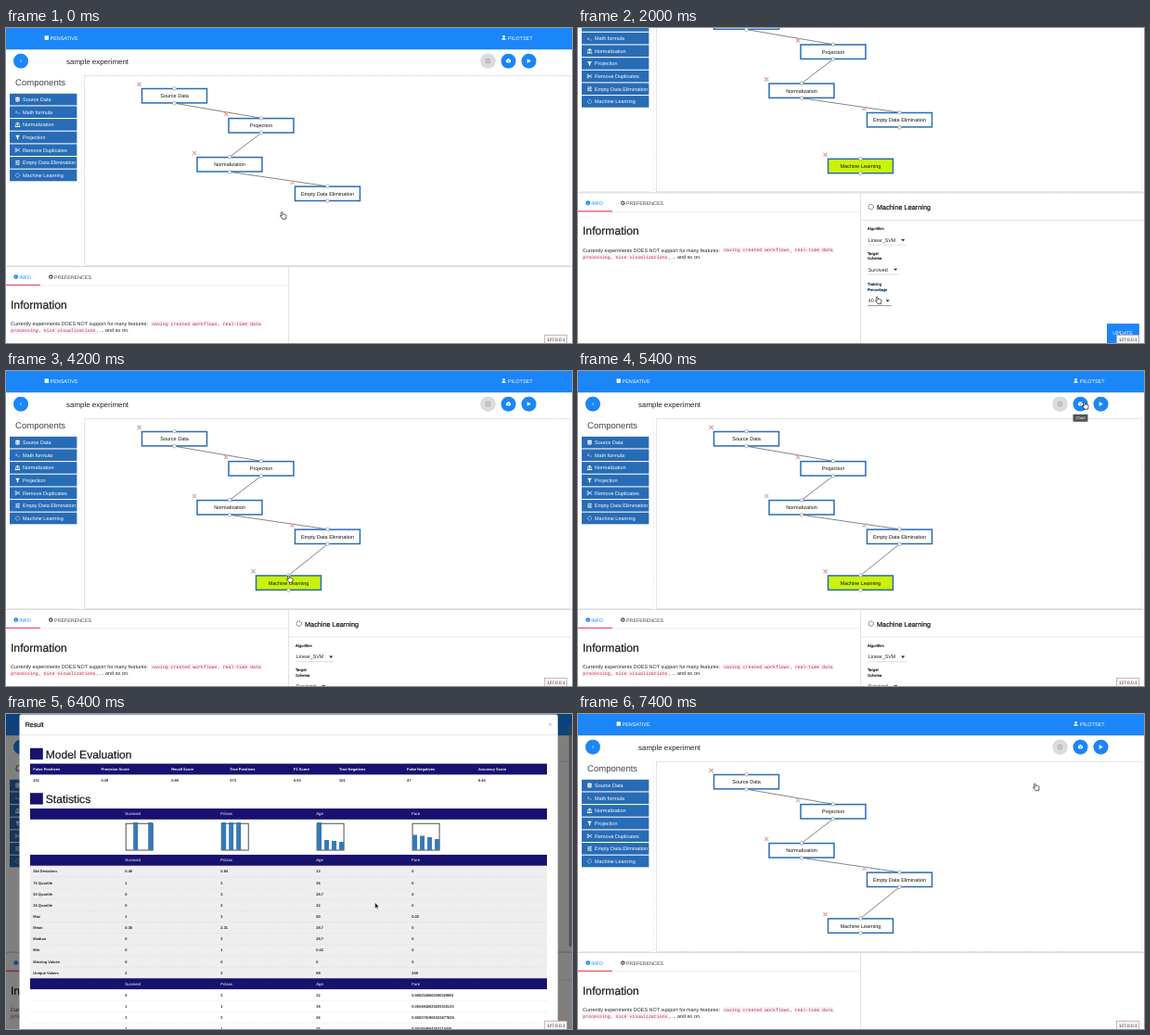
An HTML page that plays this animation: 610 by 340 pixels, repeating every 7500 ms.

```html
<!DOCTYPE html>
<html lang="en">
<head>
<meta charset="utf-8">
<title>Workflow editor</title>
<style>
html, body { margin: 0; width: 100%; height: 100%; overflow: hidden; background: #fff; }
svg { display: block; width: 610px; height: 340px; }
text { font-family: "Liberation Sans", Arial, sans-serif; text-rendering: geometricPrecision; white-space: pre; }
.code { font-family: "Liberation Mono", monospace; fill: #c7254e; }
.bold { font-weight: bold; }
.medium { stroke: currentColor; stroke-width: .2; }
.lift { filter: drop-shadow(0 .6px .7px #0005); }
.off { display: none; }
</style>
</head>
<body>
<svg id="stage" viewBox="0 0 610 340"></svg>
<script>
const LOOP = 7500, STEP = 100;
const BLUE = '#1a86fa', STEEL = '#286cb6', NAVY = '#17126f', INK = '#222', LIME = '#c9f20c';

// Drawing helpers: each returns markup; text is centred on cy.
const attrs = o => Object.entries(o).map(([k, v]) => ` ${k}="${v}"`).join('');
const tag = (name, o, inner = '') => `<${name}${attrs(o)}>${inner}</${name}>`;
const rect = (x, y, x2, y2, fill, o = {}) =>
  tag('rect', { x, y, width: x2 - x, height: y2 - y, fill, ...o });
const line = (x1, y1, x2, y2, stroke, o = {}) => tag('line', { x1, y1, x2, y2, stroke, ...o });
const circle = (cx, cy, r, fill, o = {}) => tag('circle', { cx, cy, r, fill, ...o });
const path = (d, o = {}) => tag('path', { d, fill: 'none', ...o });
const text = (x, cy, size, str, o = {}) =>
  tag('text', { x, y: +(cy + size * .36).toFixed(2), 'font-size': size, fill: INK, ...o }, str);
const group = (o, ...parts) => tag('g', o, parts.join(''));
const at = (x, y, ...parts) => group({ transform: `translate(${x} ${y})` }, ...parts);
const DASH = { 'stroke-width': .6, 'stroke-dasharray': '1.5 1' };

// Icons, drawn around their own centre
const spinner = (r, color) => circle(0, 0, r, 'none',
  { stroke: color, 'stroke-width': r * .36, 'stroke-dasharray': `${r * .45} ${r * .335}` });
const cube = (s, fill, gap) => path(`M0 ${-s}L${s} ${-s / 2}V${s / 2}L0 ${s}L${-s} ${s / 2}V${-s / 2}Z`, { fill }) +
  path(`M${-s} ${-s / 2}L0 0L${s} ${-s / 2}M0 0V${s}`, { stroke: gap, 'stroke-width': .5 });
const wire = d => path(d, { stroke: '#fff', 'stroke-width': .7 });
const solid = (d, fill = '#fff') => path(d, { fill });

const parts = [
  ['Source Data', solid('M-2.3-2Q0-3.2 2.3-2V2Q0 3.2-2.3 2Z') + path('M-2.3-.9Q0 .2 2.3-.9M-2.3.8Q0 1.9 2.3.8', { stroke: STEEL, 'stroke-width': .5 })],
  ['Math formula', text(-2.5, -.4, 5, 'x', { fill: '#fff' }) + text(.4, 1.6, 3, '2', { fill: '#fff' })],
  ['Normalization', solid('M-2.6-.8L0-2.7L2.6-.8ZM-2.7 1.6H2.7V2.6H-2.7Z') + wire('M-1.7-.6V1.6M0-.6V1.6M1.7-.6V1.6')],
  ['Projection', solid('M-2.4-2.2H2.4L.7 0V2.6L-.7 1.6V0Z')],
  ['Remove Duplicates', wire('M-1.4-1L2.6 1.6M-1.4 1L2.6-1.6') + circle(-1.9, -1.3, .8, 'none', { stroke: '#fff', 'stroke-width': .6 }) + circle(-1.9, 1.3, .8, 'none', { stroke: '#fff', 'stroke-width': .6 })],
  ['Empty Data Elimination', wire('M-2.4-1.8H2.4M-2.4 0H2.4M-2.4 1.8H2.4M1-2.6V-1M-1-.8V.8M.8 1V2.6')],
  ['Machine Learning', spinner(2.1, '#fff')]
];

const port = y => circle(0, y, 1.8, '#fff', { stroke: '#888', 'stroke-width': .6 });
const nodeBody = (label, o = {}) =>
  rect(-35, -7.7, 35, 7.7, '#fff', { stroke: STEEL, 'stroke-width': 1.5, ...o }) +
  text(0, .2, 5.5, label, { 'text-anchor': 'middle', fill: '#111' }) + port(-8) + port(8) +
  path('M-40-14.4L-35.8-10.2M-35.8-14.4L-40-10.2', { stroke: '#dba9a9', 'stroke-width': 1.3 });
const nodes = [['Source Data', 181.5, 73.2], ['Projection', 275, 105.3],
  ['Normalization', 241, 147.3], ['Empty Data Elimination', 346.5, 178.8]];
const EDGE = { 'stroke-width': .9 };
const edges = nodes.slice(1).map(([, x, y], i) =>
  line(nodes[i][1], nodes[i][2] + 8, x, y - 8, '#777', EDGE)).join('');
const ML = [304.5, 228.6];

const round = (x, fill, icon) => circle(x, 35.6, 7.9, fill, { class: 'lift' }) + at(x, 35.6, icon);

const topBars = rect(0, -90, 610, 23.3, BLUE) +
  rect(41.6, 8.4, 46, 12.8, '#fff') +
  text(47.5, 10.6, 5.45, 'PENSATIVE', { fill: '#fff' }) +
  at(536.5, 10.5, circle(0, -1.2, 1.3, '#fff'), solid('M-2.3 2.3Q-2.3.2 0 .2T2.3 2.3Z')) +
  text(541, 10.6, 5.5, 'PILOTSET', { fill: '#fff' }) +
  rect(0, 23.3, 610, 48, '#fff', { class: 'lift' }) +
  round(16, BLUE, wire('M.7-1.4L-.6 0L.7 1.4')) +
  text(65, 35.7, 7.95, 'sample experiment') +
  round(519.5, '#dcdcdc', path('M-2.3-2.3H1.5L2.3-1.5V2.3H-2.3ZM-1.2-2.3V-.8H1V-2.3M-1.3 2.3V.6H1.3V2.3', { stroke: '#aaa', 'stroke-width': .7 })) +
  round(541.5, BLUE, cube(2.5, '#fff', BLUE)) +
  round(563.5, BLUE, solid('M-1.8-2.3L2.4 0L-1.8 2.3Z'));

const sidebar = rect(2, 51, 78, 256.3, '#fff', { class: 'lift' }) +
  text(10, 59, 9.55, 'Components', { fill: '#444' }) +
  parts.map(([label, icon], i) => {
    const y = 77.1 + 13.65 * i;
    return rect(4, y - 6.3, 76.4, y + 6.3, STEEL) + at(12.5, y, icon) +
      text(18, y, 5.5, label, { fill: '#fff' });
  }).join('');

const canvas = line(81.5, 51, 81.5, 256, '#ddd', DASH) +
  rect(84.5, 51.3, 608, 256.3, '#fff', { class: 'lift' }) +
  rect(84.5, 51.3, 608, 256.3, 'none', { stroke: '#d4d4d4', ...DASH }) +
  edges + line(346.5, 186.8, 346.5, 186.8, '#777', { id: 'edge', ...EDGE }) +
  nodes.map(([label, x, y]) => at(x, y, nodeBody(label))).join('') +
  group({ id: 'ml' }, nodeBody('Machine Learning', { id: 'mlBox' }));

const code = (x, y, str) =>
  rect(x - 1, y - 3.2, x + 1 + str.length * 2.96, y + 3.2, '#f9f2f4', { rx: .8 }) +
  text(x, y, 4.93, str, { class: 'code', fill: '#c7254e' });
const info = line(0, 277.9, 304, 277.9, '#ccc', DASH) + rect(0, 276.8, 37, 278, '#ee4d6d') +
  circle(10.7, 268.6, 2.4, BLUE) + text(10.7, 268.7, 4, 'i', { fill: '#fff', 'text-anchor': 'middle', class: 'bold' }) +
  text(14.2, 268.7, 5.4, 'INFO', { fill: BLUE }) +
  circle(48.3, 268.6, 1.5, 'none', { stroke: '#555', 'stroke-width': 1.1 }) +
  circle(48.3, 268.6, 2.2, 'none', { stroke: '#555', 'stroke-width': .8, 'stroke-dasharray': '.86 .868' }) +
  text(52, 268.7, 5.35, 'PREFERENCES', { fill: '#444' }) +
  text(5, 298.5, 12.15, 'Information', { class: 'medium' }) +
  text(5, 319.2, 5.45, 'Currently experiments DOES NOT support for many features:') +
  code(157, 319.2, 'saving created workflows') + text(228.8, 319.2, 5.45, ',') +
  code(233.6, 319.2, 'real-time data') + code(5.3, 326.5, 'processing') +
  text(35.8, 326.5, 5.45, ',') + code(40.6, 326.5, 'nice visualizations') +
  text(98, 326.5, 5.45, ', ... and so on.') +
  line(304.6, 258, 304.6, 430, '#d5d5d5', { 'stroke-width': .7 });

const field = (labels, y, value, width, id = '') =>
  labels.map((s, i) => text(312, y + 5.5 * i, 4.2, s, { fill: '#666', class: 'medium', ...(id && { 'data-focus': 1 }) })).join('') +
  text(312.7, y + 5.5 * labels.length + 6.7, 5.4, value) +
  at(312 + width - 3.8, y + 5.5 * labels.length + 6.7, solid('M-2-1H2L0 1.4Z', '#222')) +
  line(312, y + 5.5 * labels.length + 12, 312 + width, y + 5.5 * labels.length + 12, '#bbb',
    { 'stroke-width': .5, ...(id && { id }) });
const panel = group({ id: 'panel' },
  at(315.8, 272.7, spinner(2.7, '#333')),
  text(322, 273, 7.3, 'Machine Learning', { class: 'medium' }),
  line(305, 287.1, 610, 287.1, '#ddd', { 'stroke-width': .7 }),
  field(['Algorithm'], 296.3, 'Linear_SVM', 42),
  field(['Target', 'Schema'], 322.6, 'Survived', 34),
  field(['Training', 'Percentage'], 356.3, '40', 25.5, 'focusLine'),
  rect(570, 398.8, 604.8, 419.6, BLUE, { class: 'lift' }),
  text(576.3, 408.8, 5.4, 'UPDATE', { fill: '#fff' }));

const tip = group({ id: 'tip' }, rect(533.5, 46.8, 549.5, 54.7, '#555', { rx: .8 }),
  text(541.5, 50.8, 4.2, 'Chart', { fill: '#fff', 'text-anchor': 'middle' }));

// Result dialog
const COLS = [128.3, 231.3, 334.2, 437.2], PITCH = 12.16;
const heading = (y, str) => rect(26, y - 6.2, 39.8, y + 6.2, NAVY) + text(42.8, y + .2, 12.1, str, { class: 'medium' });
const bar = y => rect(26, y - 5.9, 583, y + 5.9, NAVY);
const cell = (x, y, str, o = {}) => text(x, y, 4, str, { class: 'bold', ...o });
const colBar = y => bar(y) + ['Survived', 'Pclass', 'Age', 'Fare'].map((s, i) =>
  text(COLS[i], y, 4.3, s, { fill: '#fff' })).join('');
const rule = y => line(26, y, 583, y, '#d2d2d2', { 'stroke-width': .5, 'stroke-dasharray': '1 1' });
const scores = [['False Positives', 29.3, '431'], ['Precision Score', 102.5, '0.39'], ['Recall Score', 178.2, '0.85'],
  ['True Positives', 241.3, '273'], ['F1 Score', 310, '0.53'], ['True Negatives', 359, '101'],
  ['False Negatives', 432, '47'], ['Accuracy Score', 509, '0.44']];
const stats = ['Std Deviation|0.49|0.84|13|0', '75 Quartile|1|3|35|0', '50 Quartile|0|3|29.7|0',
  '25 Quartile|0|2|22|0', 'Max|1|3|80|0.02', 'Mean|0.38|2.31|29.7|0', 'Median|0|3|29.7|0',
  'Min|0|1|0.42|0', 'Missing Values|0|0|0|0', 'Unique Values|2|3|89|248'];
const samples = ['0|3|22|0.0002526660390329891', '1|1|38|0.0024842624225310133', '1|3|26|0.0002761906322877628',
  '1|1|35|0.001850584362710436', '0|3|35|0.0002805469514090209', '0|3|29.7|0.0002947704321990983',
  '0|1|54|0.0018073106540922147', '0|3|2|0.0007344318460731205', '1|3|27|0.0003879860120475391',
  '1|2|14|0.0010479110364812075'];
const charts = [[0, 30, 0, 30], [30, 30, 30, 0], [30, 11, 10, 9], [16.5, 15.5, 14, 12]];
const chart = (heights, i) => {
  const x = COLS[i] + .9;
  return rect(x, 118.2, x + 29, 147, '#fff', { stroke: '#222', 'stroke-width': .8 }) +
    heights.map((h, k) => h && rect(x + 8 * k, 147 - h, x + 8 * k + 5, 147, '#3579b8')).filter(Boolean).join('');
};
const dialog = group({ id: 'dialog' },
  rect(14.5, .6, 594.7, 452, '#fff', { rx: 2 }),
  text(20.7, 11.7, 7.1, 'Result', { class: 'medium' }),
  path('M585.2 9.9L588 12.7M588 9.9L585.2 12.7', { stroke: '#aaa', 'stroke-width': .8 }),
  line(14.5, 22.6, 594.7, 22.6, '#ddd', { 'stroke-width': .7 }),
  heading(43, 'Model Evaluation'), bar(59.5),
  scores.map(([s, x, v]) => cell(x, 59.5, s, { fill: '#fff' }) + cell(x, 71.6, v)).join(''),
  heading(91.4, 'Statistics'), colBar(107.9), charts.map(chart).join(''),
  rect(26, 163, 583, 286, '#eeeeee'),
  rect(26, 188, 583, 200.2, '#a8dce8', { id: 'hover' }),
  colBar(157.8),
  stats.map((row, i) => {
    const y = 169.9 + PITCH * i;
    return rule(y + 6) + row.split('|').map((s, k) => cell(k ? COLS[k - 1] : 29.3, y, s)).join('');
  }).join(''),
  colBar(291.2),
  samples.map((row, i) => {
    const y = 303.3 + PITCH * i;
    return rule(y + 6) + row.split('|').map((s, k) => cell(COLS[k], y, s)).join('');
  }).join(''));

const status = rect(580.5, 331.4, 604.5, 341, '#f6f2f2', { stroke: '#b9a0a0', 'stroke-width': .7 }) +
  text(583, 336.2, 4.7, '127.0.0.1', { fill: '#333' });
const OUTLINE = { 'stroke-width': .7, 'stroke-linejoin': 'round' };
const cursor = group({ id: 'cursor' },
  path('M0 0V6.4L1.5 5.1L2.5 7.4L3.5 7L2.5 4.7H4.5Z', { id: 'arrow', ...OUTLINE, fill: '#111', stroke: '#fff', 'stroke-width': .5 }),
  path('M-1 .6Q-.2-.4.5.7L1.1 2.8L2 2.5L3 2.8L4 3.2Q4.7 3.5 4.5 5L4 7.7H.6L-1.8 4.6Q-2.2 3.7-1.2 3.8L-.2 4.4Z', { id: 'hand', ...OUTLINE, fill: '#fff', stroke: '#111' }));

const stage = document.getElementById('stage');
stage.innerHTML = group({ id: 'page' }, rect(0, 0, 610, 430, '#fff'), topBars, sidebar, canvas,
    line(0, 257.4, 610, 257.4, '#ccc', { 'stroke-width': .8 }), info, panel, tip) +
  rect(0, 0, 610, 340, '#000', { id: 'shade' }) + dialog +
  rect(606.8, 0, 609.6, 262, '#444', { id: 'thumb', rx: 1.4 }) + status + cursor;
const el = Object.fromEntries([...stage.querySelectorAll('[id]')].map(e => [e.id, e]));
const focusLabels = stage.querySelectorAll('[data-focus]');

// Tracks: [time, value, value...], straight between keys
const tracks = {
  cursor: [[0, 297.5, 198.5], [500, 40, 159], [600, 40, 159], [1000, 304, 228], [1300, 304, 228], [1900, 322.5, 290],
    [2200, 322.5, 290], [2700, 587, 326], [2900, 587, 326], [3200, 482.7, 257], [3400, 482.7, 257], [3800, 346.5, 186.8],
    [4200, 304.5, 220.6], [4400, 304.5, 220.6], [4800, 563, 34], [5000, 563, 34], [5200, 545.5, 33.5], [5400, 545.5, 33.5],
    [5700, 397.7, 203.5], [6500, 397.7, 203.5], [6700, 586, 23], [6900, 586, 23], [7200, 492.5, 75]],
  ml: [[600, 40, 159], [1000, ...ML]],
  scroll: [[1300, 0], [1600, 79.6], [3200, 79.6], [3300, 6], [3400, 0]],
  dialogScroll: [[5700, 0], [5900, 37.5], [6100, 138], [6200, 138], [6400, 13], [6500, 0]],
  dialog: [[5400, 0], [5700, 1], [6800, 1], [7100, 0]],
  thumb: [[1300, 0], [1400, .8], [1700, .8], [1900, 0], [3200, 0], [3300, .8], [3700, .8], [3900, 0],
    [5700, 0], [5800, .8], [6600, .8], [6800, 0]]
};
const sample = (keys, t) => {
  const i = keys.findIndex(k => k[0] > t);
  if (i === 0) return keys[0].slice(1);
  if (i < 0) return keys.at(-1).slice(1);
  const a = keys[i - 1], b = keys[i], u = (t - a[0]) / (b[0] - a[0]);
  return a.slice(1).map((v, k) => v + (b[k + 1] - v) * u);
};
const move = (e, x, y) => e.setAttribute('transform', `translate(${x} ${y})`);
const show = (e, on) => e.classList.toggle('off', !on);

function draw(t) {
  const within = (a, b) => t >= a && t < b;
  const now = name => sample(tracks[name], t);
  const [x, y] = now('cursor'), [scroll] = now('scroll'), [inner] = now('dialogScroll'), [open] = now('dialog');

  move(el.page, 0, -scroll);
  move(el.cursor, x, y);
  const arrow = within(2900, 3500) || within(5600, 6700);
  show(el.arrow, arrow);
  show(el.hand, !arrow);

  const selected = within(1200, 7300);
  show(el.ml, t >= 600);
  move(el.ml, ...now('ml'));
  el.mlBox.setAttribute('fill', selected ? LIME : '#fff');
  show(el.panel, selected);
  const focus = within(1800, 2700);
  focusLabels.forEach(e => e.setAttribute('fill', focus ? BLUE : '#666'));
  el.focusLine.setAttribute('stroke', focus ? '#222' : '#bbb');

  show(el.edge, t >= 3800);
  const [ex, ey] = t < 4200 ? [x, y] : [ML[0], ML[1] - 8];
  el.edge.setAttribute('x2', ex);
  el.edge.setAttribute('y2', ey);
  show(el.tip, within(5200, 5500));

  show(el.shade, open > 0);
  show(el.dialog, open > 0);
  el.shade.setAttribute('opacity', open * .5);
  el.dialog.setAttribute('opacity', open);
  move(el.dialog, 0, 13 - inner - 60 * (1 - open));
  show(el.hover, within(5700, 6000));

  const inDialog = open > 0;
  el.thumb.setAttribute('opacity', now('thumb')[0]);
  el.thumb.setAttribute('height', inDialog ? 240 : 262);
  el.thumb.setAttribute('y', inDialog ? 2 + inner * .69 : scroll * .81);
}

let start;
function tick(time) {
  start ??= time;
  draw(Math.floor((time - start) % LOOP / STEP) * STEP);
  requestAnimationFrame(tick);
}
draw(0);
requestAnimationFrame(tick);
</script>
</body>
</html>
```
